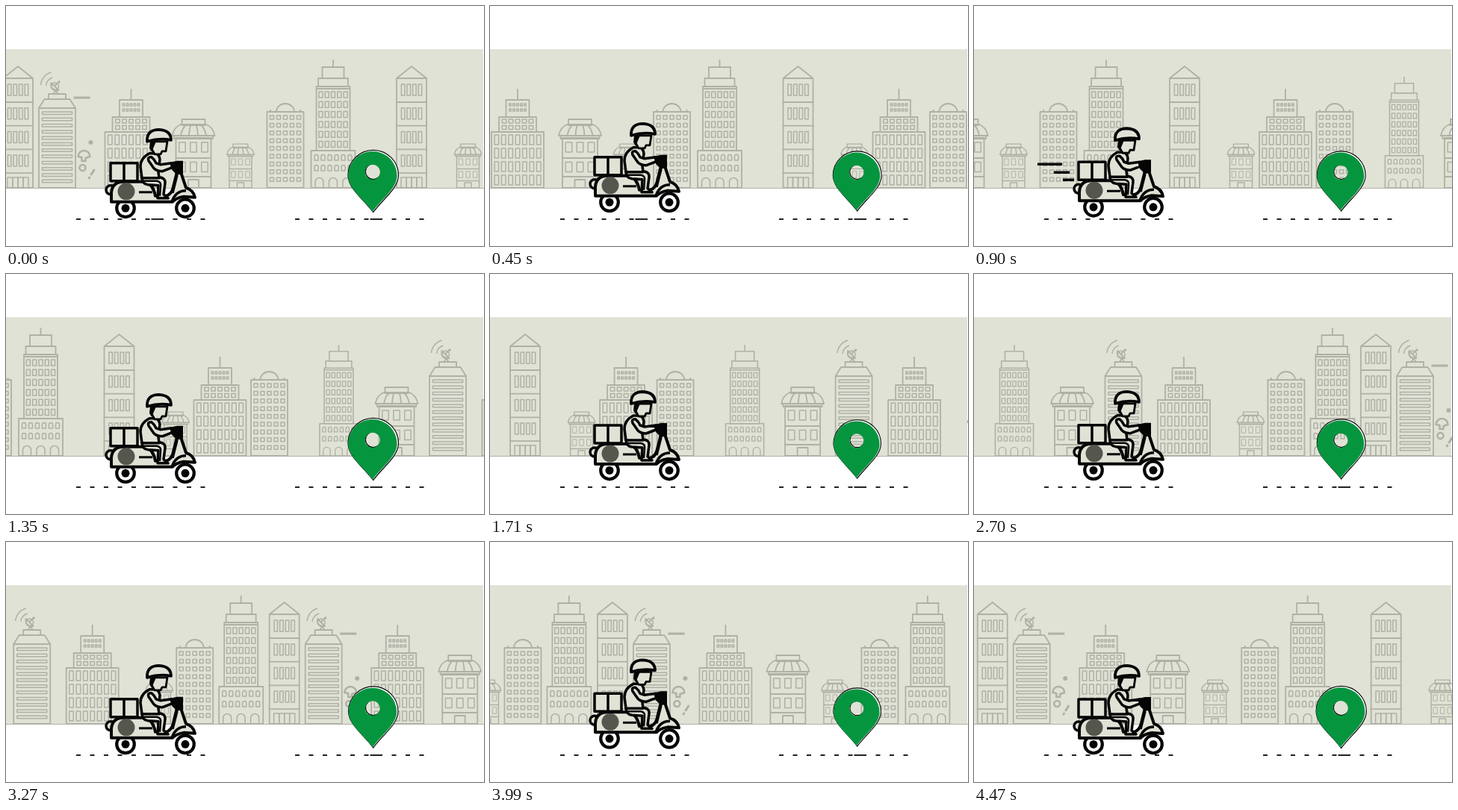
An HTML page with a canvas that plays this animation: 640 px wide and 322 px high, repeating every 4500 ms.

```html
<!DOCTYPE html>
<html>
<head>
<meta charset="utf-8">
<title>Scooter delivery</title>
<style>
html, body { margin: 0; height: 100%; overflow: hidden; background: #fff; }
canvas { display: block; }
</style>
</head>
<body>
<canvas id="stage" width="640" height="322"></canvas>
<script>
const ctx = document.getElementById('stage').getContext('2d');
const LOOP = 4500, STEP = 30, CYCLES = 4, CITY = 1305, GROUND = 244;
const SKY = '#e0e2d6', LINE = '#afb1a5', INK = '#050505', GREEN = '#06953f';

// Cosine wave over one bounce cycle, highest at the given phase
const wave = (phase, peak) => Math.cos(2 * Math.PI * (phase - peak));

function shape(d, fill, stroke, width) {
  const path = new Path2D(d);
  if (fill) { ctx.fillStyle = fill; ctx.fill(path, 'evenodd'); }
  if (stroke) { ctx.strokeStyle = stroke; ctx.lineWidth = width; ctx.stroke(path); }
}

function disc(x, y, r, fill, stroke, width) {
  shape(`M${x - r} ${y}a${r} ${r} 0 1 1 ${2 * r} 0a${r} ${r} 0 1 1 ${-2 * r} 0Z`, fill, stroke, width);
}

// Building parts: x is measured from the building's centre line
const line = d => ctx.stroke(new Path2D(d));
function block(half, top, bottom) {
  ctx.fillRect(-half, top, 2 * half, bottom - top);
  ctx.strokeRect(-half, top, 2 * half, bottom - top);
}
function windows(cols, rows, dx, top, dy, w, h) {
  ctx.lineWidth = 1.5;
  for (let r = 0; r < rows; r++)
    for (let c = 0; c < cols; c++)
      ctx.strokeRect((c - (cols - 1) / 2) * dx - w / 2, top + r * dy, w, h);
}

const buildings = {
  gable() {
    block(20, 97, GROUND);
    line('M-20 97L0 81L20 97');
    for (let y = 129; y < 230; y += 31.7) line(`M-21 ${y}H21`);
    windows(4, 4, 7.6, 105, 31.7, 4.5, 15);
    windows(4, 1, 7, 230, 0, 7, 14);
  },
  dish() {
    block(24.5, 137, GROUND);
    line('M-24.5 137L-17 125H17L24.5 137M-11.5 125V118H11.5V125');
    line('M-5 118L-2 113L1 118M-8 103Q-10 113 2 113ZM-4 108L2 102');
    disc(-3, 108, 5, null, LINE, 1.5);
    disc(2.5, 102, 1.8, LINE);
    line('M-15 107A12 12 0 0 1 -6 96M-22 106A19 19 0 0 1 -8 89');
    windows(1, 12, 1, 142, 8.3, 40, 3.5);
  },
  slab() {
    block(35, 169, GROUND);
    block(25, 149, 169);
    block(15.5, 126, 149);
    line('M0 126V111');
    windows(5, 2, 5, 131, 7, 2.5, 3);
    windows(5, 2, 9, 152, 8.5, 5.5, 5);
    windows(7, 4, 9.4, 173, 18, 5.5, 13);
  },
  house() {
    block(23.5, 177, GROUND);
    block(15.5, 152, 160);
    line('M-17 159Q-26 162 -28.5 174H28.5Q26 162 17 159Z');
    for (const x of [-17, -6, 6, 17]) line(`M${x} 174Q${x * .9} 164 ${x * .6} 160`);
    line('M-26 174V178H26V174M-24 204H24M-24 229H24M-7 244V233H7V244');
    windows(3, 2, 15, 183, 26.5, 8.5, 13);
  },
  cottage() {
    ctx.translate(0, GROUND * .36);
    ctx.scale(.64, .64);
    ctx.lineWidth = 2.3;
    buildings.house();
  },
  grid() {
    block(24.5, 142, GROUND);
    line('M-12 142A12 11 0 0 1 12 142M-20 142V139M20 142V139');
    windows(5, 9, 9, 147, 10.4, 5, 5);
  },
  tower() {
    block(29.5, 194, GROUND);
    block(22.5, 108, 194);
    block(20, 97, 108);
    block(14.5, 82, 97);
    line('M0 82V72M-22 111H22');
    windows(5, 6, 8.3, 115, 13.3, 5, 8);
    for (let x = -25; x < 25; x += 9)
      for (const y of [207, 221]) line(`M${x} ${y}v-5a2.5 2.5 0 0 1 5 0v5Z`);
    for (const x of [-24, -5.5, 13]) line(`M${x} 244v-8a5.5 5.5 0 0 1 11 0v8`);
  },
  turret() {
    ctx.translate(0, GROUND * .134);
    ctx.scale(.866, .866);
    buildings.tower();
  },
  litter() {
    ctx.lineWidth = 3;
    line('M22 123H44M42 232L44 229M45 227L50 219');
    disc(45, 183, 3, LINE);
    disc(34, 217, 4, null, LINE, 2.5);
    line('M28 202A8 8 0 0 1 44 202L38 204V208H33V203Z');
  }
};

const city = {
  gable: [16, 543], dish: [68.5, 983], litter: [68.5], slab: [167.5, 678, 1064],
  house: [251, 914.5], cottage: [314, 618.5, 1153.5], grid: [374, 744, 1201],
  tower: [438, 1263], turret: [837]
};

function drawCity(t) {
  ctx.fillStyle = SKY;
  ctx.fillRect(0, 58, 639, 187);
  for (const kind in city) for (const x of city[kind]) {
    ctx.save();
    ctx.translate((x - CITY * t / LOOP + CITY + 80) % CITY - 80, 0);
    ctx.fillStyle = SKY;
    ctx.strokeStyle = LINE;
    ctx.lineWidth = 1.8;
    buildings[kind]();
    ctx.restore();
  }
  ctx.fillStyle = LINE;
  ctx.fillRect(0, 244, 640, 1);
}

function drawRoad(x) {
  ctx.fillStyle = '#222';
  for (let i = 0; i < 10; i++) ctx.fillRect(x + i * 18.5 - (i > 6 ? 7 : 0) * 0, 285, i < 9 || i === 9 ? 6 : 0, 2);
  ctx.fillRect(x + 100.5, 285, 13, 2);
}

function drawScooter(phase) {
  ctx.save();
  ctx.translate(0, 4.2 * wave(phase, .95) - 3.2);
  if (phase > .65 && phase < .85)
    shape('M85 213H118M107 224H128M119 234H134', null, INK, 3.5);
  disc(140, 246, 6, SKY, INK, 3.5);
  for (const x of [160, 240]) {
    disc(x, 270.5, 11.8, '#fff', INK, 4.2);
    disc(x, 270.5, 5.5, INK);
  }
  // body, front column and fender
  shape('M141 262V250Q142 235 158 235H186Q197 238 200 254H214Q222 252 224 242L229 222H234L241 243Q251 246 253 256L238 255Q227 257 223 262Z', SKY, INK, 4);
  shape('M222 262Q227 247 241 247M229 226L223 250', null, INK, 3.5);
  shape('M178 249H196', null, INK, 3);
  disc(161, 248, 11.5, '#55574f');
  shape('M140 210H176V234H140ZM158 210V234', SKY, INK, 3.5);
  // legs and shoe
  shape('M182 229H203Q214 229 213 237L211 252L217 257H203L204 240L190 239Q182 238 182 229Z', SKY, INK, 3.5);
  shape('M184 234H202Q208 235 207 241L206 254', null, INK, 2.5);
  // torso and arm
  shape('M192 197Q180 203 180 215L182 230H205L204 222L206 205Q205 198 200 197Z', SKY, INK, 3.5);
  shape('M191 207Q189 201 195 202Q199 205 201 210L207 212L222 210V216L209 221Q202 221 198 217Z', SKY, INK, 3.5);
  // head and helmet
  shape('M195 181V191L199 198H207L209 194H214L216 181Z', SKY, INK, 2.8);
  shape('M193 181H201L198 188L195 195L192 190Z', INK);
  shape('M189 181Q188 165 205 165Q221 166 221 179Q205 176 189 181Z', SKY, INK, 3.8);
  // handlebar and lamp
  shape('M220 209L229 207H237V224L229 226L222 219Z', INK);
  ctx.restore();
}

const PIN = 'M0 42C-12 25 -34 10 -34 -8A34 34 0 0 1 34 -8C34 10 12 25 0 42Z';
const HOLE = 'M-10.5 -13a10.5 10.5 0 1 1 21 0a10.5 10.5 0 1 1 -21 0Z';

function drawPin(phase) {
  const scale = .965 + .035 * wave(phase, .1);
  ctx.save();
  ctx.translate(491.7, 235);
  ctx.scale(scale, scale);
  shape(PIN + HOLE, '#fff', INK, 1.2);
  ctx.translate(-.9, .5);
  ctx.scale(.97, .97);
  shape(PIN + HOLE, GREEN);
  ctx.restore();
}

function frame(now) {
  const t = Math.floor(now % LOOP / STEP) * STEP;
  const phase = t * CYCLES / LOOP % 1;
  ctx.fillStyle = '#fff';
  ctx.fillRect(0, 0, 640, 322);
  drawCity(t);
  for (const x of [94, 387]) drawRoad(x);
  drawScooter(phase);
  drawPin(phase);
  requestAnimationFrame(frame);
}
ctx.lineJoin = 'round';
requestAnimationFrame(frame);
</script>
</body>
</html>
```
